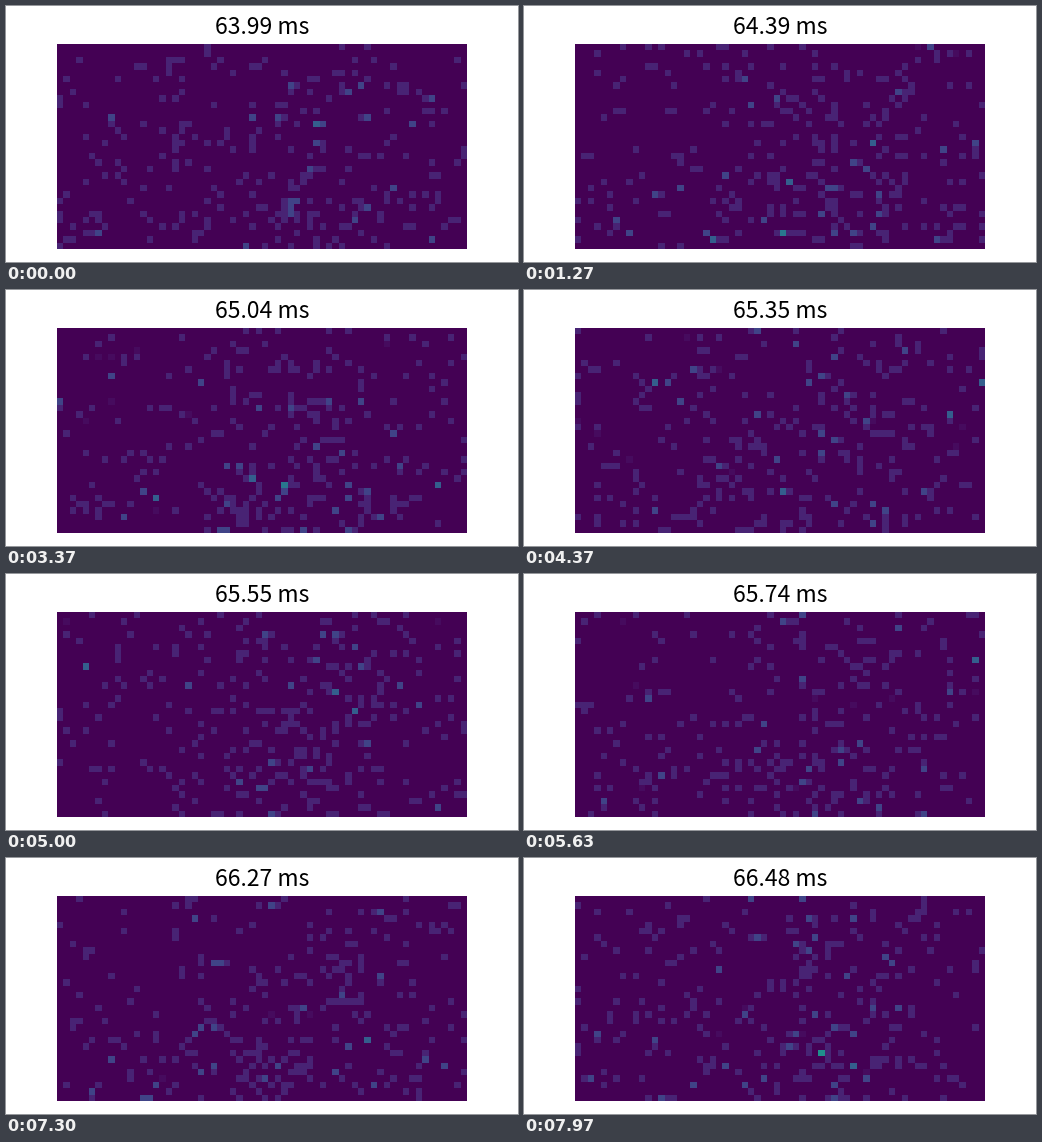
Recreate the animation shown at these times as a matplotlib script. Size 512 by 256 pixels, loop 8 s.

```python
import numpy as np
import matplotlib.pyplot as plt
from matplotlib.animation import FuncAnimation

W, H, DPI = 512, 256, 100
COLS, ROWS = 64, 32
FRAMES, FPS = 240, 30
START_MS, STEP_MS = 63.99, 1 / 96
MAX_COUNT = 10

col, row = np.meshgrid(np.arange(COLS), np.arange(ROWS))


def blob(x, y, sx, sy):
    return np.exp(-((col - x) / sx) ** 2 / 2 - ((row - y) / sy) ** 2 / 2)


def hit_rate(n):
    """Even background with two busy regions that sway slowly."""
    sway = np.sin(2 * np.pi * n / FRAMES)
    lower = blob(36 + 2 * sway, 26, 11, 6)
    upper = blob(41 - 2 * sway, 9 + 2 * sway, 8, 8)
    return 0.085 + 0.19 * lower + 0.10 * upper


def counts(n):
    """Sparse hits in short horizontal runs, plus a few faint cells."""
    rng = np.random.default_rng(900 + n)
    gain = rng.exponential(size=(ROWS, COLS))
    gain = (gain + np.roll(gain, 1, axis=1)) / 2
    grid = rng.poisson(hit_rate(n) * gain).astype(float)
    faint = (grid == 0) & (rng.random(grid.shape) < 0.002)
    grid[faint] = 0.3
    return grid


fig = plt.figure(figsize=(W / DPI, H / DPI), dpi=DPI, facecolor="white")
ax = fig.add_axes([0.1, 0.05, 0.8, 0.8])
ax.axis("off")
image = ax.imshow(counts(0), cmap="viridis", vmin=0, vmax=MAX_COUNT,
                  interpolation="nearest", aspect="auto")
title = fig.text(0.5, 1 - 28 / H, "", ha="center", va="baseline",
                 family="Noto Sans CJK JP", size=23 * 72 / DPI, color="black")


def update(n):
    image.set_data(counts(n))
    title.set_text(f"{START_MS + n * STEP_MS:.2f} ms")
    return image, title


anim = FuncAnimation(fig, update, frames=FRAMES, interval=1000 / FPS,
                     repeat=True, repeat_delay=0, blit=False)
plt.show()
```
